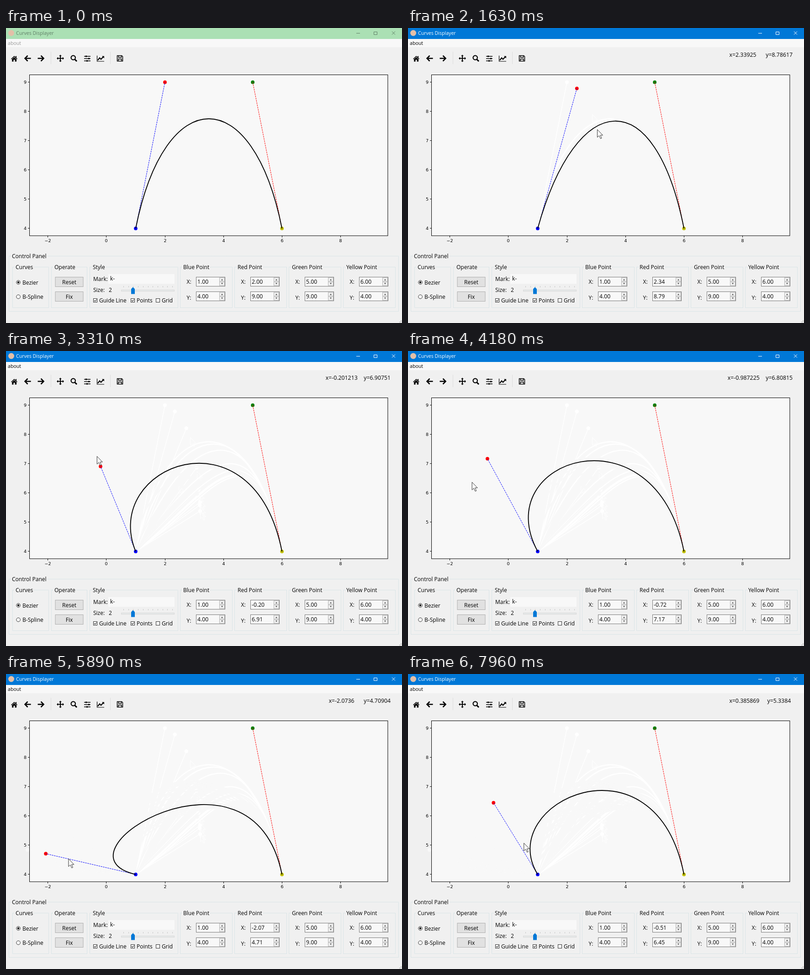
Animation of 867 by 646 pixels, one loop 7990 ms. Source, as an HTML page with a canvas:

```html
<!DOCTYPE html>
<html lang="en">
<head>
<meta charset="utf-8">
<title>Curves Displayer</title>
<style>
html, body { margin: 0; width: 100%; height: 100%; overflow: hidden; background: #f0f0f0; }
canvas { display: block; }
</style>
</head>
<body>
<canvas id="stage" width="867" height="646"></canvas>
<script>
const c = document.getElementById('stage').getContext('2d');
const LOOP = 7990, STEP = 130, PHASE = 40, LAG = 150, DRAG = 1600;
const UI = '"Open Sans", sans-serif', PLOT = '"DejaVu Sans", sans-serif';
const blue = [1, 4], green = [5, 9], yellow = [6, 4];

// Key points of the mouse: time, x and y in axis units
const keys = [
  [100, 6.56, 10.23], [500, 3.75, 7.23], [1060, 2, 9], [1350, 2, 9],
  [1450, 2.33925, 8.78617], [1580, 2.73, 8.21], [1630, 3.03, 7.39],
  [2100, 3.20386, 5.3811], [2290, 3.19, 5.84],
  [3040, -0.201213, 6.90751], [3140, -0.201213, 6.90751], [3310, -0.33, 7.26],
  [3670, -0.4, 7.5], [4450, -1.55, 5.47], [4830, -1.10852, 4.13221],
  [5050, -1.655, 4.25], [5500, -2.7, 4.84], [6300, 0.2, 4.15],
  [6520, 0.00159698, 4.10019], [6760, -0.42, 4.5], [7300, -0.93, 6.6],
  [7690, -0.51, 6.45], [7820, 0.385869, 5.3384], [7960, 0.52, 5.08]
];

// Monotone cubic through the keys: smooth, with no overshoot at rests and turns
function mouseAt(t) {
  const i = keys.findIndex(k => k[0] > t) - 1;
  if (i === -1) return keys[0].slice(1);
  if (i < 0) return keys.at(-1).slice(1);
  const [a, b] = [keys[i], keys[i + 1]], h = b[0] - a[0], p = (t - a[0]) / h;
  return [1, 2].map(n => {
    const slope = j => keys[j] && keys[j + 1]
      ? (keys[j + 1][n] - keys[j][n]) / (keys[j + 1][0] - keys[j][0]) : 0;
    const tangent = j => {
      const l = slope(j - 1), r = slope(j);
      return l * r > 0 ? 2 * l * r / (l + r) : 0;
    };
    return a[n] + p * p * (3 - 2 * p) * (b[n] - a[n])
      + h * p * (1 - p) * ((1 - p) * tangent(i) - p * tangent(i + 1));
  });
}
// The plot is redrawn at a slow beat and trails the mouse.
const lastUpdate = t => Math.floor((t - PHASE) / STEP) * STEP + PHASE;
const redAt = t => t < DRAG ? [2, 9] : mouseAt(lastUpdate(t) - LAG);
const toPx = ([x, y]) => [219.9 + 64.05 * x, 438.9 - 64.05 * (y - 4)];

function text(s, x, y, size = 12, color = '#000', align = 'left', font = UI) {
  c.font = size + 'px ' + font;
  c.fillStyle = color;
  c.textAlign = align;
  c.fillText(s, x, y);
}
function fill(x, y, w, h, color) {
  c.fillStyle = color;
  c.fillRect(x, y, w, h);
}
function outline(x, y, w, h, color) {
  c.strokeStyle = color;
  c.lineWidth = 1;
  c.strokeRect(x, y, w, h);
}
function box(x, y, w, h, bg, edge) {
  fill(x, y, w, h, bg);
  outline(x, y, w, h, edge);
}
function line(points, color, width = 1, dash = []) {
  c.beginPath();
  points.forEach(p => c.lineTo(...p));
  c.strokeStyle = color;
  c.lineWidth = width;
  c.setLineDash(dash);
  c.stroke();
  c.setLineDash([]);
}
function circle(x, y, r, color, edge) {
  c.beginPath();
  c.arc(x, y, r, 0, 7);
  if (color) { c.fillStyle = color; c.fill(); }
  if (edge) { c.strokeStyle = edge; c.lineWidth = r > 4.5 ? 2.2 : 1; c.stroke(); }
}
function shape(d, x, y, color, edge, width = 1, flip = 1) {
  const p = new Path2D(d);
  c.save();
  c.translate(x, y);
  c.scale(flip, 1);
  c.lineWidth = width;
  if (color) { c.fillStyle = color; c.fill(p); }
  if (edge) { c.strokeStyle = edge; c.stroke(p); }
  c.restore();
}

function titleBar(active) {
  const ink = active ? '#fff' : '#5f7f66';
  fill(0, 0, 867, 24, active ? '#0078d7' : '#abe0b4');
  circle(11.5, 11, 6.5, '#e3c0a8');
  text('Curves Displayer', 22, 15, 10.6, ink);
  shape('M767 11.5h8M805.5 8.5h7v6h-7zM845 7.5l7 7M852 7.5l-7 7', 0, 0, null, ink);
  fill(0, 24, 867, 18, '#f8f8f8');
  text('about', 4, 37, 10.6, active ? '#000' : '#999');
}

function toolbar() {
  const y = 66.5, arrow = 'M0-6L-6 0 0 6M-6 0H7';
  shape('M-7 1L0-5.5 7 1 6 2 0-3.5-6 2zM3-5h2v4l-2-2zM-5 2L0-2.5 5 2V7H1.5V3h-3V7H-5z', 18, y, '#000');
  shape(arrow, 47.5, y, null, '#000', 2.6);
  shape(arrow, 76.5, y, null, '#000', 2.6, -1);
  shape('M-6 0H6M0-6V6', 119, y, null, '#000', 2);
  shape('M-8 0l3-3v6zM8 0l-3-3v6zM0-8l-3 3h6zM0 8l-3-3h6z', 119, y, '#000');
  circle(147.2, 65, 4.7, null, '#000');
  line([[150.5, 68.5], [155, 73]], '#000', 3);
  shape('M-7-4.5H7M-7 .5H7M-7 5.5H7', 178, y, null, '#000', 1.3);
  shape('M-4-6h3v3h-3zM2-1h3v3h-3zM-2 4h3v3h-3z', 178, y, '#000');
  shape('M-7.5-6V6.5H8', 207, y, null, '#000', 1.2);
  shape('M-6 4L-2-1 1 2 6-3.5', 207, y, null, '#000', 2.2);
  shape('M3-5H8V0z', 207, y, '#000');
  shape('M-6-6H4L6-4V6H-6zM-3-6v4H3v-4M-3.5 6V1.5H3.5V6', 249.5, y, null, '#000', 1.5);
  for (const x of [98, 228]) fill(x, 52, 1, 27, '#dcdcdc');
}

function group(title, x, y, w, h) {
  c.setLineDash([2, 1]);
  outline(x + 0.5, y + 0.5, w, h, '#cfdfe2');
  c.setLineDash([]);
  c.font = '12px ' + UI;
  fill(x + 5, y - 4, c.measureText(title).width + 4, 9, '#f0f0f0');
  text(title, x + 7, y + 4.5);
}
function button(label, y) {
  box(108, y, 61, 21, '#e1e1e1', '#adadad');
  text(label, 138.5, y + 15, 12, '#000', 'center');
}
function radio(label, y, on) {
  circle(27, y, 4.3, '#f8f8f8', '#333');
  if (on) circle(27, y, 2.4, '#222');
  text(label, 36, y + 4.5);
}
function check(label, x, on) {
  box(x + 0.5, 592.5, 8, 8, '#f8f8f8', '#333');
  if (on) line([[x + 2, 596.5], [x + 4, 598.5], [x + 7.5, 594.5]], '#222', 1.1);
  text(label, x + 13, 601);
}
function slider() {
  for (let i = 0; i < 11; i++) fill(Math.round(257 + i * 10.7), 565, 1, 3, '#c4c4c4');
  box(252.5, 573.5, 116, 3, '#e7eaea', '#d9d9d9');
  shape('M274 571.5L278 567.5 282 571.5V582.5H274z', 0, 0, '#0078d7');
}
function spinner(x, y, value) {
  box(x + 0.5, y + 0.5, 63, 20, '#f8f8f8', '#7a7a7a');
  for (const side of [-1, 1]) {
    const mid = y + 10.5 + side * 4.5;
    box(x + 51.5, mid - 4, 11, 8, '#f0f0f0', '#b4b4b4');
    shape(`M-2 ${-1.5 * side}L0 ${side} 2 ${-1.5 * side}z`, x + 57, mid, '#333');
  }
  text(value.toFixed(2), x + 3, y + 15, 12.2);
}
function panel(red) {
  group('Control Panel', 6, 499, 853, 121);
  group('Curves', 14, 523, 79, 89);
  radio('Bezier', 557, true);
  radio('B-Spline', 588.5, false);
  group('Operate', 99, 523, 78, 89);
  button('Reset', 545.5);
  button('Fix', 577.5);
  group('Style', 183, 523, 193, 89);
  text('Mark:', 191, 554);
  fill(224, 539, 145, 21, '#f8f8f8');
  text('k-', 228, 553);
  text('Size:', 191, 578);
  text('2', 225, 578);
  slider();
  check('Guide Line', 191, true);
  check('Points', 273, true);
  check('Grid', 328, false);
  Object.entries({ Blue: blue, Red: red, Green: green, Yellow: yellow }).forEach(([name, p], i) => {
    const x = 381 + 119 * i;
    group(name + ' Point', x, 523, 114, 89);
    text('X:', x + 14.5, 559.5);
    text('Y:', x + 14.5, 594.5);
    spinner(x + 35, 545, p[0]);
    spinner(x + 35, 577, p[1]);
  });
  shape('M864 640h2v2h-2zM861 643h2v2h-2zM864 643h2v2h-2z', 0, 0, '#bfbfbf');
}

function axes() {
  outline(51.5, 102.5, 784.4, 352.4, '#000');
  for (let v = -2; v <= 8; v += 2) {
    const x = Math.floor(toPx([v, 4])[0]) + 0.5;
    line([[x, 455], [x, 458.5]], '#000');
    text(String(v).replace('-', '\u2212'), x, 468.7, 9.5, '#000', 'center', PLOT);
  }
  for (let v = 4; v <= 9; v++) {
    const y = Math.floor(toPx([0, v])[1]) + 0.5;
    line([[48, y], [51.5, y]], '#000');
    text(v, 45, y + 3.5, 9.5, '#000', 'right', PLOT);
  }
}
function curve(red, color, width) {
  c.beginPath();
  c.moveTo(...toPx(blue));
  c.bezierCurveTo(...toPx(red), ...toPx(green), ...toPx(yellow));
  c.strokeStyle = color;
  c.lineWidth = width;
  c.stroke();
}
function pointer(p, color, edge) {
  const [x, y] = toPx(p);
  shape('M0 0V17L4 13.5 7 20 9.5 19 6.8 12.5H12z', x + 0.5, y + 0.5, color, edge, 0.9);
}
// Each update wipes the previous drawing; the early wipes leave a whiter trace.
function traces(t) {
  for (let u = DRAG; u <= lastUpdate(t); u += STEP) {
    const red = redAt(u - STEP), early = u < 2530;
    if (String(red) === String(redAt(u))) continue;
    const color = early ? '#fff' : '#f8f8f8';
    line([toPx(blue), toPx(red)], color, 1.6);
    curve(red, color, 2.6);
    circle(...toPx(red), 4.2, color);
    if (early && u < t) pointer(mouseAt(u), null, color);
  }
}
function plot(red) {
  const colors = ['#00f', '#f00', '#008000', '#bfbf00'];
  [blue, red, green, yellow].forEach((p, i) => circle(...toPx(p), 3.9, colors[i]));
  line([toPx(blue), toPx(red)], '#00f', 1, [3.5, 1.5]);
  line([toPx(green), toPx(yellow)], '#f00', 1, [3.5, 1.5]);
  curve(red, '#000', 1.9);
}

// The readout runs slightly ahead of the redraw.
function readout(t, mouse) {
  if (t < DRAG && mouse[1] > 9.25) return;
  const [x, y] = (t < DRAG ? mouse : redAt(t + 20)).map(v => String(Number(v.toPrecision(6))));
  const right = 842 - Math.max(0, 7 - y.length) * 3.8;
  const gap = 10 + Math.max(0, 10 - x.length) * 3.6;
  text('y=' + y, right, 63, 12.3, '#000', 'right');
  text('x=' + x, right - c.measureText('y=' + y).width - gap, 63, 12.3, '#000', 'right');
}

function draw(now) {
  const t = Math.floor((now % LOOP - 10) / 30) * 30 + 10;
  const red = redAt(t), mouse = mouseAt(t);
  fill(0, 0, 867, 646, '#f0f0f0');
  titleBar(t >= 1100);
  toolbar();
  fill(51, 102, 785, 353, '#f8f8f8');
  traces(t);
  plot(red);
  axes();
  panel(red);
  if (t >= 100) {
    readout(t, mouse);
    pointer(mouse, '#f8f8f8', '#222');
  }
}

let start;
function tick(now) {
  start ??= now;
  draw(now - start);
  requestAnimationFrame(tick);
}
requestAnimationFrame(tick);
</script>
</body>
</html>
```
